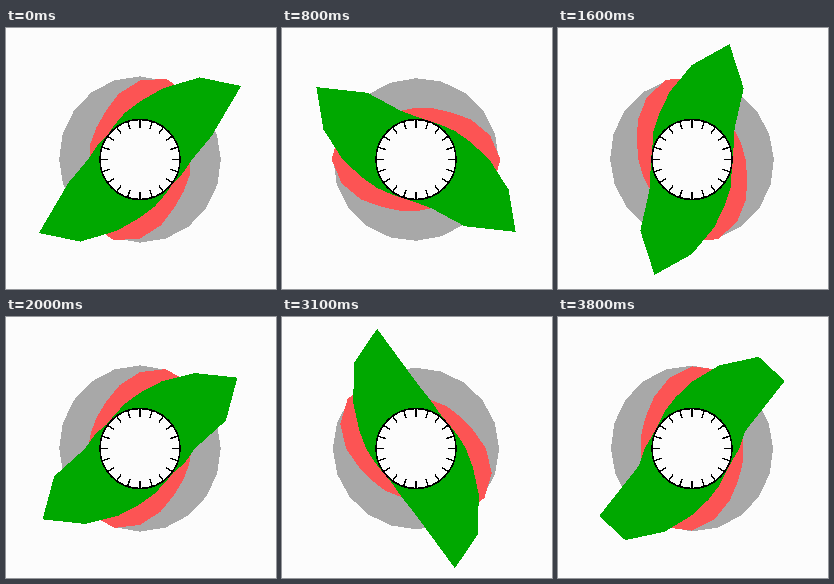
An HTML page that plays this animation: 270x261 px, repeating every 4 s.

```html
<!DOCTYPE html>
<html lang="en">
<head>
<meta charset="utf-8">
<title>Rotating field</title>
<style>
  html, body { margin: 0; width: 100%; height: 100%; overflow: hidden; background: #fcfcfc; }
  svg { display: block; width: 100vw; height: 100vh; }
</style>
</head>
<body>
<svg viewBox="0 0 270 261" shape-rendering="crispEdges">
  <g transform="translate(134 131.5)">
    <polygon id="grey" fill="#a8a8a8"/>
    <polygon id="red" fill="#fc5454"/>
    <polygon id="green" fill="#00a800"/>
    <circle r="40" fill="#fcfcfc" stroke="#000" stroke-width="1.6"/>
    <path id="ticks" stroke="#000" stroke-width="1.4"/>
  </g>
</svg>
<script>
const SLOTS = 20, STEPS = 39, STEP_MS = 100, LOOP_MS = 4000;
const RAD = Math.PI / 180;
const byId = id => document.getElementById(id);

// Radius against angle from the field axis; both profiles repeat every 180 degrees.
const RED = [[-90, 59], [-72, 69], [-54, 79], [-36, 85], [-18, 81], [0, 70],
  [18, 56], [36, 50.5], [54, 52], [72, 54], [90, 59]];
const GREEN = [[-90, 43], [-72, 49], [-54, 58], [-36, 75], [-27, 87], [-20, 97],
  [-16, 106], [-9, 113], [-5, 120], [0, 125], [4, 127], [6.5, 121], [9.2, 115],
  [11, 101], [13.4, 90], [15.2, 86], [18, 75], [20, 66], [27, 56], [35, 51],
  [54, 42], [72, 40.5], [90, 43]];

const wrap = a => ((a + 90) % 180 + 180) % 180 - 90;

function sample(curve, x) {
  const i = Math.max(1, curve.findIndex(p => p[0] >= x));
  const [x0, r0] = curve[i - 1], [x1, r1] = curve[i];
  return r0 + (r1 - r0) * (x - x0) / (x1 - x0);
}

const point = (r, a) =>
  (r * Math.cos(a * RAD)).toFixed(1) + ',' + (r * Math.sin(a * RAD)).toFixed(1);

const radius = {
  grey: x => 82 + 1.2 * Math.cos(2 * (x + 65) * RAD),
  red: x => sample(RED, x),
  green(x, a) {
    // the falling flank arrives later around 18 degrees
    const lag = 6 * Math.max(0, Math.cos(2 * (a - 18) * RAD)) ** 4;
    return sample(GREEN, x > 8 ? x - lag : x);
  }
};

const angles = Array.from({ length: SLOTS }, (_, i) => i * 360 / SLOTS);

byId('ticks').setAttribute('d',
  angles.map(a => `M${point(32, a)}L${point(40, a)}`).join(''));

let shown = -1;
function draw(now) {
  const step = Math.min(STEPS - 1, Math.floor(now % LOOP_MS / STEP_MS));
  if (step !== shown) {
    shown = step;
    const axis = step * 360 / STEPS - 36;
    for (const id in radius) {
      byId(id).setAttribute('points',
        angles.map(a => point(radius[id](wrap(a - axis), a), a)).join(' '));
    }
  }
}

const start = performance.now();
function tick() {
  draw(performance.now() - start);
  requestAnimationFrame(tick);
}
tick();
</script>
</body>
</html>
```
